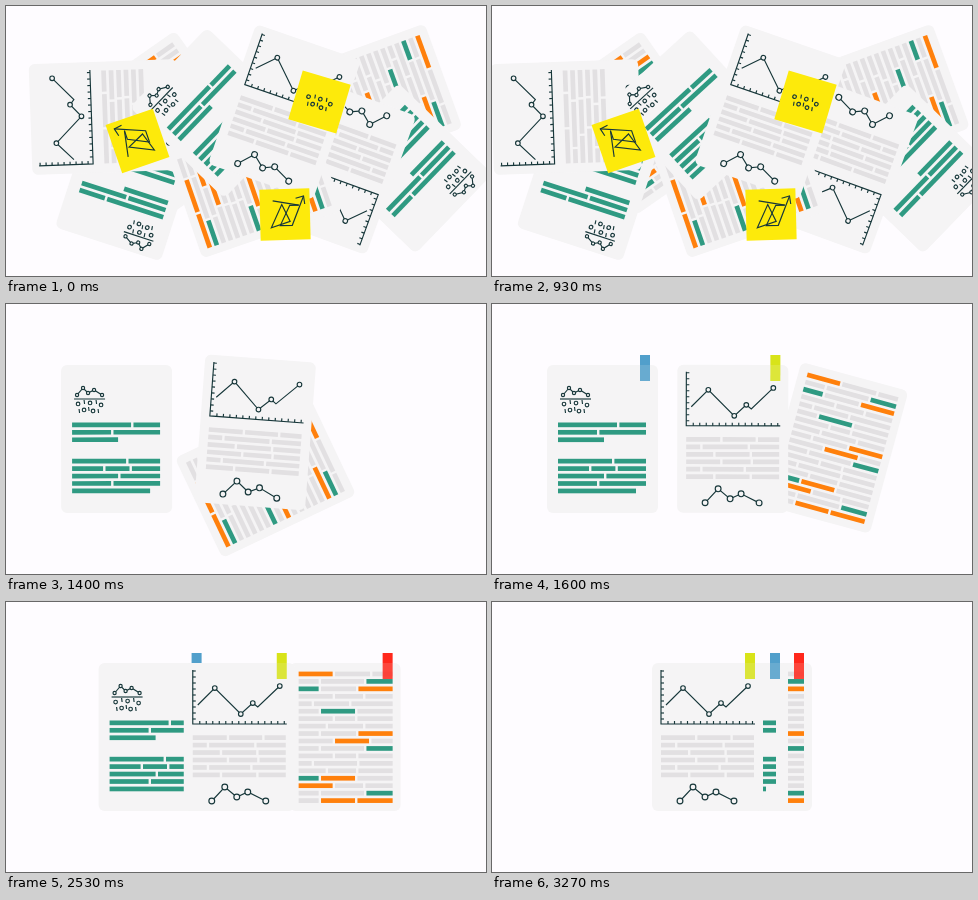
An HTML page with a canvas that plays this animation: 480x270 px, repeating every 3.34 s.

```html
<!DOCTYPE html>
<html lang="en">
<head>
<meta charset="utf-8">
<title>Sorting papers</title>
<style>
html, body { margin: 0; width: 100%; height: 100%; overflow: hidden; background: #fefcff; }
canvas { display: block; }
</style>
</head>
<body>
<canvas width="480" height="270"></canvas>
<script>
const ctx = document.querySelector('canvas').getContext('2d');
const LOOP = 3340, STEP = 200 / 3, MOVE = 900;
const W = 111, H = 148, PITCH = 7.45;
const INK = '#17373a', PAPER = '#f5f4f5', YELLOW = '#fdea0b';
const BAR = { g: '#e2e0e2', n: '#2f9a82', o: '#ff800c' };

// Each token is a colour and a width; without a width the bar runs to the margin.
const GREEN_1 = ['n59 n', 'n39 n', 'n46'];
const GREEN_2 = ['n54 n', 'n31 n24 n', 'n46 n', 'n39 n', 'n78'];
const GREY = ['g34 g33 g', 'g14 g45 g', 'g27 g34 g', 'g34 g28 g', 'g14 g41 g', 'g27 g34 g'];
const MIXED = ['o34 g35 g', 'g20 g43 n', 'n20 g35 o', 'g34 g28 g', 'g13 g35 g', 'g20 n34 g',
  'g34 g20 g', 'g27 g35 g', 'g20 g35 o', 'g34 o34 g', 'g20 g43 n', 'g34 g21 g',
  'g13 g43 g', 'g27 g28 g', 'n20 o34 g', 'o34 g28 g', 'g20 g43 n', 'g20 o34 o'];

const clamp = v => Math.min(1, Math.max(0, v));
const mix = (a, b, p) => a + (b - a) * p;
const ease = u => u < .5 ? 16 * u ** 5 : 1 - 16 * (1 - u) ** 5;
const progress = (t, start) => ease(clamp((t - start) / MOVE));

function placed(x, y, angle, draw) {
  ctx.save();
  ctx.translate(x, y);
  ctx.rotate(angle * Math.PI / 180);
  draw();
  ctx.restore();
}

function line(points, closed) {
  ctx.beginPath();
  points.forEach(([x, y]) => ctx.lineTo(x, y));
  if (closed) ctx.closePath();
  ctx.stroke();
}

function dots(points, r, fill) {
  ctx.fillStyle = fill;
  for (const [x, y] of points) {
    ctx.beginPath();
    ctx.arc(x, y, r, 0, 7);
    ctx.fill();
    ctx.stroke();
  }
}

function bars(rows, x, y, width) {
  rows.forEach((row, i) => {
    let left = 0;
    for (const token of row.split(' ')) {
      const w = +token.slice(1) || width - left;
      ctx.fillStyle = BAR[token[0]];
      ctx.fillRect(x + left, y + i * PITCH, w, 4.7);
      left += w + 2.4;
    }
  });
}

function scatter(fill) {
  dots([[-12, -2], [0, -3], [11, -1], [-6, 4], [3, 5]], 1.8, fill);
  for (const [x, y] of [[-6, -4], [6, -4], [-11, 5], [-1.5, 3], [8, 5]]) line([[x, y - 2], [x + .5, y + 2]]);
}

const contents = {
  green() {
    const peaks = [[16, 30], [22, 23], [27, 28], [33, 25], [41, 30]];
    line(peaks);
    dots(peaks, 1.6, PAPER);
    line([[13, 34], [44, 34]]);
    placed(29, 41, 0, () => scatter(PAPER));
    bars(GREEN_1, 11, 57.5, 88);
    bars(GREEN_2, 11, 93.8, 88);
  },
  chart() {
    line([[9, 7], [9, 61], [103, 61]]);
    for (let y = 8; y < 58; y += 6) line([[9, y], [12, y]]);
    for (let x = 16; x < 103; x += 6.5) line([[x, 61], [x, 58]]);
    const curve = [[14, 42], [31, 25], [57, 51], [69, 40], [74, 44], [96, 23]];
    line(curve);
    dots([1, 2, 3, 5].map(i => curve[i]), 2.3, PAPER);
    bars(GREY, 9, 72.3, 93);
    const low = [[28, 138], [41, 124], [53, 134], [64, 129], [82, 138]];
    line(low);
    dots(low, 2.9, PAPER);
  },
  mixed() { bars(MIXED, 9, 8.6, 94); }
};

// Green pages have a shorter top margin while they lie in the pile.
const CROP = { green: 17, chart: 0, mixed: 0 };

function page(kind, x, y, angle, pile, tab, grow = 0) {
  placed(x, y, angle, () => {
    ctx.translate(-W / 2, -H / 2);
    const top = CROP[kind] * pile;
    ctx.fillStyle = PAPER;
    ctx.beginPath();
    ctx.roundRect(0, top, W, H - top, 6);
    ctx.fill();
    contents[kind]();
    if (!grow) return;
    const h = 26 * grow;
    ctx.fillStyle = tab;
    ctx.fillRect(93, -10, 10, Math.min(10, h));
    ctx.globalAlpha = .85;
    ctx.fillRect(93, 0, 10, Math.max(0, h - 10));
  });
}

function scribble() {
  line([[-12, -14], [14, -9]]);
  line([[19, -18], [7, 11], [-5, 11], [5, -9], [14, -9]]);
  line([[11, -16], [19, -18], [20, -10]]);
  line([[-3, -10], [5, 7], [-14, 13]], true);
}

const marks = {
  left: () => placed(0, 0, -90, scribble),
  right: scribble,
  dots: () => scatter(YELLOW)
};

function note(mark, x, y, angle) {
  placed(x, y, angle, () => {
    ctx.fillStyle = YELLOW;
    ctx.fillRect(-25, -25.5, 50, 51);
    marks[mark]();
  });
}

// kind, centre, angle, travel to the side
const loose = [
  ['mixed', 166, 117, 145, -259],
  ['green', 119.3, 184, 198, -330],
  ['chart', 98.5, 111, -92, -330],
  ['mixed', 368, 95, 70, 290],
  ['green', 407, 168.4, 134, 290],
  ['chart', 333, 160.5, 200, 226]
];

// kind, first centre and angle, final x, start, shift when stacked, tab, tab start
const kept = [
  ['mixed', 248.5, 176, 71, 369.5, 1080, -105, '#ff281c', 1930],
  ['green', 203.5, 101, -46, 110.5, 626, 130, '#519fcb', 1420],
  ['chart', 278.5, 106, 19, 240.5, 885, -25, '#d8e319', 1420]
];

// mark, centre, angle, way out
const notes = [
  ['left', 131.5, 135, -19, -240, 0],
  ['dots', 313.5, 96, 16.5, 0, -185],
  ['right', 279, 208.5, -1.5, 0, 180]
];

function draw(t) {
  ctx.fillStyle = '#fefcff';
  ctx.fillRect(0, 0, 480, 270);
  ctx.strokeStyle = INK;
  ctx.lineWidth = 1.15;
  const leave = progress(t, 626), lift = progress(t, 900), stack = progress(t, 2130);
  for (const [kind, x, y, angle, travel] of loose) page(kind, x + travel * leave, y, angle, 1);
  for (const [kind, x, y, angle, endX, start, shift, tab, tabStart] of kept) {
    const p = progress(t, start);
    page(kind, mix(x, endX, p) + shift * stack, mix(y, 135, p), angle * (1 - p), 1 - p,
      tab, clamp((t - tabStart) / 140));
  }
  for (const [mark, x, y, angle, dx, dy] of notes) note(mark, x + dx * lift, y + dy * lift, angle);
}

let begin;
function tick(now) {
  begin ??= now;
  const step = Math.floor(((now - begin) % LOOP + 5) / STEP);
  draw(Math.min(49, step) * STEP);
  requestAnimationFrame(tick);
}
requestAnimationFrame(tick);
</script>
</body>
</html>
```
